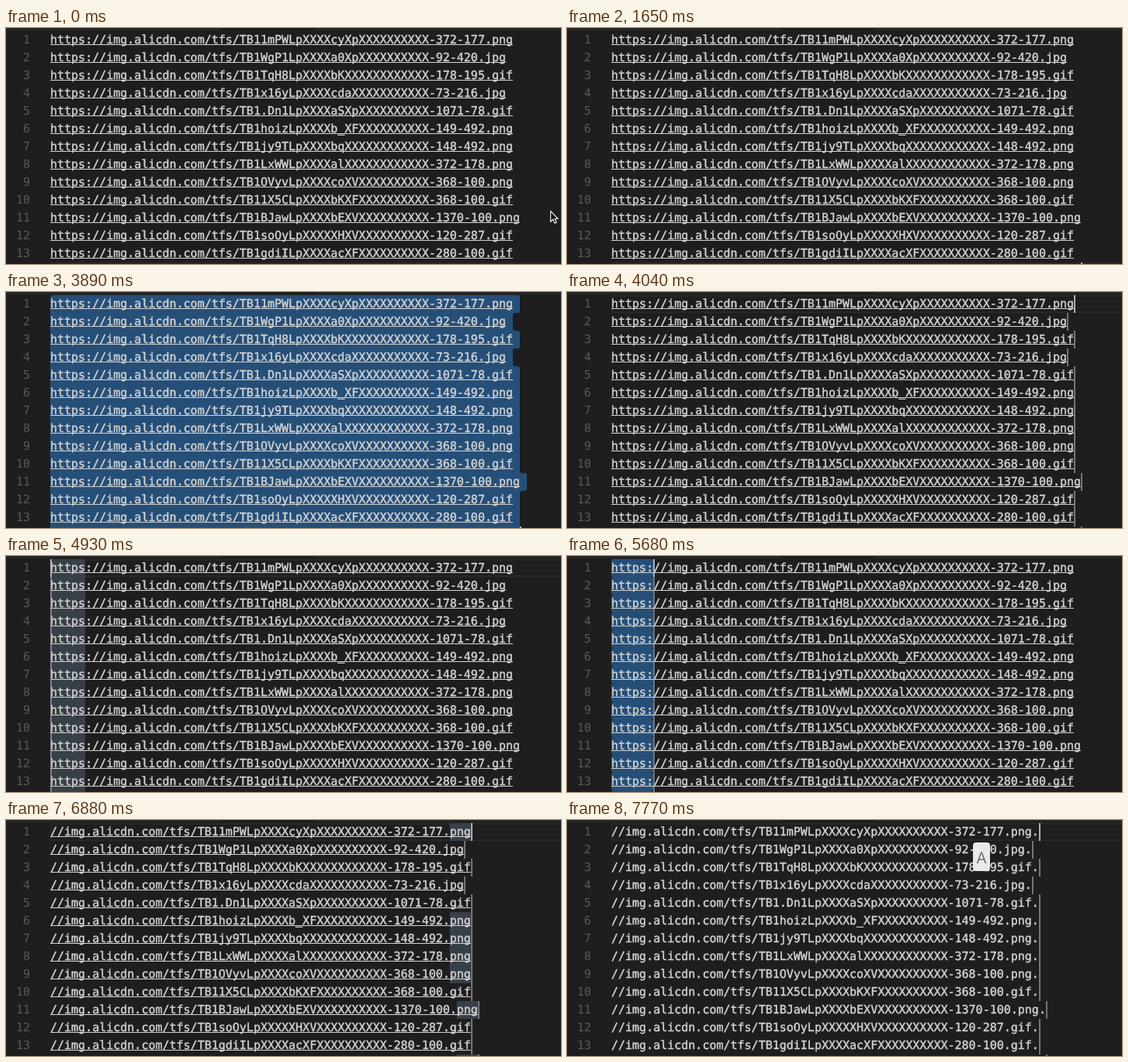
Animation, 715 px wide and 305 px high, one loop 8 s. Source, as an HTML page:

```html
<!DOCTYPE html>
<html lang="en">
<head>
<meta charset="utf-8">
<title>Multi-cursor editing</title>
<style>
  html, body { margin: 0; width: 100%; height: 100%; overflow: hidden; background: #1e1e1e; }
  svg { display: block; }
  text { font: 15px "DejaVu Sans Mono", monospace; fill: #d4d4d4; text-rendering: geometricPrecision; }
  .line { stroke: #d4d4d4; stroke-width: .4; }
  .num { fill: #5a5a5a; text-anchor: end; }
  .sel { fill: #264f78; }
  .word { fill: #373f48; }
  .active { fill: none; stroke: #282828; stroke-width: 2; }
  .underline { fill: #d4d4d4; }
  .caret { fill: #aeafad; }
  .secondary { opacity: .6; }
  #key text { font: 300 20px Inter, sans-serif; fill: #555; text-anchor: middle; }
</style>
</head>
<body>
<svg width="715" height="305" viewBox="0 0 715 305">
  <rect width="715" height="3" fill="#252526"/>
  <rect x="277" width="121" height="3" fill="#1e1e1e"/>
  <g id="back"></g>
  <g id="code"></g>
  <g id="front"></g>
  <path id="mouse" d="M.7 .7V14.2L3.8 11.3L6 16.2L8.2 15.2L6.1 10.5H10Z" fill="#000" stroke="#fff" stroke-width="1.1"/>
  <g id="key">
    <rect x="523" y="29" width="22" height="37" rx="4" fill="#e9e9e9"/>
    <text x="534" y="56">A</text>
  </g>
</svg>
<script>
const LOOP = 8000, LEFT = 57, TOP = 4, ROW = 23, CHAR = 9.03;
const HOST = 'https://img.alicdn.com/tfs/';
const FILES = [
  'TB11mPWLpXXXXcyXpXXXXXXXXXX-372-177.png',
  'TB1WgP1LpXXXXa0XpXXXXXXXXXX-92-420.jpg',
  'TB1TqH8LpXXXXbKXXXXXXXXXXXX-178-195.gif',
  'TB1x16yLpXXXXcdaXXXXXXXXXXX-73-216.jpg',
  'TB1.Dn1LpXXXXaSXpXXXXXXXXXX-1071-78.gif',
  'TB1hoizLpXXXXb_XFXXXXXXXXXX-149-492.png',
  'TB1jy9TLpXXXXbqXXXXXXXXXXXX-148-492.png',
  'TB1LxWWLpXXXXalXXXXXXXXXXXX-372-178.png',
  'TB1OVyvLpXXXXcoXVXXXXXXXXXX-368-100.png',
  'TB11X5CLpXXXXbKXFXXXXXXXXXX-368-100.gif',
  'TB1BJawLpXXXXbEXVXXXXXXXXXX-1370-100.png',
  'TB1soOyLpXXXXXHXVXXXXXXXXXX-120-287.gif',
  'TB1gdiILpXXXXacXFXXXXXXXXXX-280-100.gif',
  'TB1kfaMLpXXXXbRXVXXXXXXXXXX-1370-120.png'
];
const LAST = FILES.length - 1;

// Each step overrides part of the editor state.
const START = {
  mouse: 701, caret: false, multi: false, col: 'end', select: 0, word: '',
  cut: 0, tail: '', links: true, key: false, active: LAST
};
const STEPS = [
  [0, {}],
  [300, { mouse: 702.5 }],
  [450, { mouse: 0 }],
  [750, { caret: true }],
  [1200, { caret: false }],
  [1650, { caret: true }],
  [1950, { select: 'all', active: -1 }],
  [2400, { caret: false }],
  [2840, { caret: true }],
  [3440, { caret: false }],
  [3890, { caret: true }],
  [4040, { select: 0, multi: true, active: 0 }],
  [4490, { caret: false }],
  [4640, { caret: true, col: 0 }],
  [4930, { word: 'https' }],
  [5080, { caret: false }],
  [5230, { caret: true, word: '', select: 5, col: 5, active: -1 }],
  [5680, { select: 6, col: 6 }],
  [6130, { select: 0, col: 0, cut: 6, active: 0 }],
  [6580, { col: 'end' }],
  [6880, { word: 'png' }],
  [7180, { caret: false, links: false }],
  [7620, { caret: true, key: true }],
  [7770, { word: '', tail: '.' }]
];
let merged = START;
const STATES = STEPS.map(([at, change]) => ({ at, ...(merged = { ...merged, ...change }) }));

const $ = id => document.getElementById(id);
const colX = n => LEFT + n * CHAR;
const rowY = i => TOP + i * ROW;
const rect = (cls, x, y, w, h, rx = 0) =>
  `<rect class="${cls}" x="${x}" y="${y}" width="${w}" height="${h}" rx="${rx}"/>`;

function roundedPath(points, r) {
  const toward = ([x, y], [u, v]) => {
    const k = r / Math.hypot(u - x, v - y);
    return [x + (u - x) * k, y + (v - y) * k];
  };
  return points.map((p, i) => {
    const prev = points.at(i - 1), next = points[(i + 1) % points.length];
    return `${i ? 'L' : 'M'}${toward(p, prev)}Q${p} ${toward(p, next)}`;
  }).join('') + 'Z';
}

function selectAll(lines) {
  const points = [[LEFT, rowY(0)]];
  const ends = lines.map((line, i) => colX(line.length + (i < LAST ? 1 : 0)));
  ends.forEach((x, i) => {
    if (x !== ends[i - 1]) points.push([x, rowY(i)]);
    if (x !== ends[i + 1]) points.push([x, rowY(i + 1)]);
  });
  points.push([LEFT, rowY(lines.length)]);
  return `<path class="sel" d="${roundedPath(points, 3)}"/>`;
}

function render(s) {
  const lines = FILES.map(file => (HOST + file).slice(s.cut) + s.tail);
  let back = '', code = '', front = '';
  if (s.active >= 0) back += rect('active', LEFT + 1, rowY(s.active) + 1, 670, ROW - 2);
  if (s.select === 'all') back += selectAll(lines);

  lines.forEach((line, i) => {
    const y = rowY(i);
    if (s.select > 0) back += rect('sel', LEFT, y, s.select * CHAR, ROW, 3);
    const at = s.word ? line.lastIndexOf(s.word) : -1;
    if (at >= 0) back += rect('word', colX(at), y, s.word.length * CHAR, ROW);

    code += `<text class="num" x="31" y="${y + 16}">${i + 1}</text>`
          + `<text class="line" x="${LEFT}" y="${y + 16}">${line}</text>`;
    if (s.links) code += rect('underline', LEFT, y + 17, line.length * CHAR, 1);

    if (s.caret && (s.multi || i === LAST)) {
      const col = s.col === 'end' ? line.length : s.col;
      const cls = s.multi && i > 0 ? 'caret secondary' : 'caret';
      front += rect(cls, Math.round(colX(col)), y, 2, ROW);
    }
  });

  $('back').innerHTML = back;
  $('code').innerHTML = code;
  $('front').innerHTML = front;
  $('mouse').style.display = s.mouse ? '' : 'none';
  $('mouse').setAttribute('transform', `translate(${s.mouse} 236)`);
  $('key').style.display = s.key ? '' : 'none';
}

let shown;
function tick() {
  const t = performance.now() % LOOP;
  const state = STATES.findLast(s => s.at <= t);
  if (state !== shown) render(shown = state);
  requestAnimationFrame(tick);
}
tick();
</script>
</body>
</html>
```
